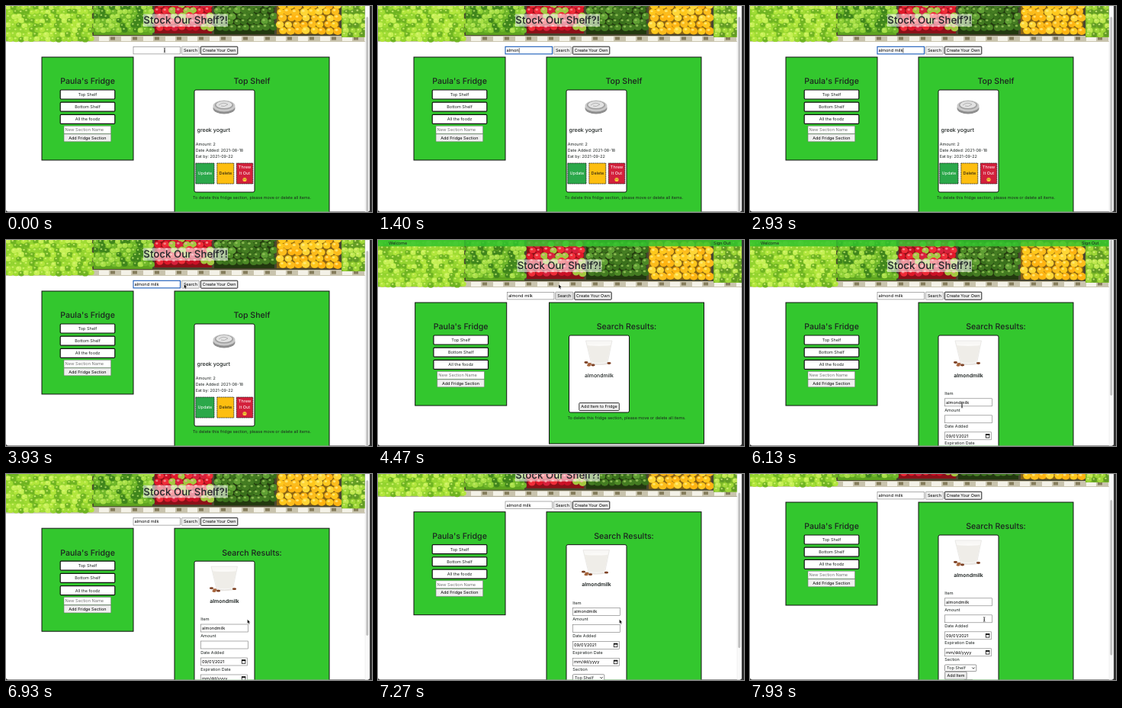
Animation, 480 px wide and 270 px high, one loop 8000 ms. Source, as an HTML page:

```html
<!DOCTYPE html>
<html lang="en">
<head>
<meta charset="utf-8">
<title>Fridge organizer</title>
<style>
  html, body { margin: 0; width: 100%; height: 100%; overflow: hidden; background: #333; }
  svg { display: block; width: 480px; height: 270px; }
  text { font-family: Inter, "Open Sans", sans-serif; white-space: pre; text-rendering: geometricPrecision; }
</style>
</head>
<body>
<svg id="stage" viewBox="0 0 480 270"></svg>
<script>
const GREEN = '#33c72e', INK = '#1c2220';
const LOOP = 8000, FPS = 15;
const SEARCHED = 4200, FORM = 5930, FOCUS = 400;
const QUERY = 'almond milk';
const KEY_TIMES = [800, 930, 1130, 1270, 1400, 1600, 2270, 2530, 2670, 2800, 2930];

// Markup helpers; text y is the middle of the line
const rect = (x, y, w, h, fill, stroke = 'none', sw = .6, r = 0) =>
  `<rect x="${x}" y="${y}" width="${w}" height="${h}" rx="${r}" fill="${fill}" stroke="${stroke}" stroke-width="${sw}"/>`;
const oval = (x, y, rx, ry, fill, more = '') =>
  `<ellipse cx="${x}" cy="${y}" rx="${rx}" ry="${ry}" fill="${fill}" ${more}/>`;
const path = (d, fill, more = '') => `<path d="${d}" fill="${fill}" ${more}/>`;
const text = (x, y, s, size = 5.5, anchor = 'start', weight = 400, fill = INK) =>
  `<text x="${x}" y="${y + size * .36}" font-size="${size}" text-anchor="${anchor}" font-weight="${weight}" fill="${fill}">${s}</text>`;
const mid = (x, y, s, size, weight, fill) => text(x, y, s, size, 'middle', weight, fill);
const group = (id, body) => `<g id="${id}">${body}</g>`;
const button = (x, y, w, label, stroke = '#777', sw = .6) =>
  rect(x, y, w, 10, '#efefef', stroke, sw, .8) + mid(x + w / 2, y + 5, label, 5.45, 400, '#000');
const field = (x, y, w, value = '', fill = '#000') =>
  rect(x, y, w, 10, '#fff', '#777') + text(x + 1.6, y + 5, value, 5.6, 'start', 400, fill);

let seed = 7;
const rnd = () => (seed = seed * 16807 % 2147483647) / 2147483647;

// Each crate: left, right, bottom, base, piece size, highlight, piece colours
function produce() {
  const crates = [
    [0, 113, 61, '#8ed02c', 4, '#dcf77c', ['#b2e63c', '#a0dc34', '#c6f055', '#6fb422', '#94d430']],
    [115, 192, 53, '#5ea320', 4, '#c6ec70', ['#8fd036', '#a9e048', '#3f851c', '#70b82a']],
    [195, 270, 51, '#8c1018', 5, '#f5a8a4', ['#e0182a', '#cc1026', '#f02c38', '#d8203c', '#a4c840']],
    [273, 352, 52, '#22380f', 5, '#a2cc62', ['#4d8a26', '#3a701c', '#60a034', '#447c22']],
    [355, 437, 52, '#8a6414', 5.5, '#fff08a', ['#ffc81c', '#ffb412', '#ffd636', '#fcbc1c']],
    [440, 480, 56, '#7cb828', 4, '#e0f48a', ['#a0d838', '#c0e850', '#629c24']]
  ];
  let out = rect(0, 0, 480, 62, '#4a4630') + rect(0, 54, 480, 8, '#c9c4ae');
  for (let x = 122; x < 480; x += 29) out += rect(x, 55, 13, 6, '#f4f2e8') + rect(x + 15, 55.5, 6, 4, '#857d5c');
  for (const [x0, x1, bottom, base, size, shine, colours] of crates) {
    out += rect(x0, 0, x1 - x0, bottom, base);
    const step = size * 1.75, cols = Math.floor((x1 - x0) / step);
    for (let y = size, row = 0; y < bottom - size / 2; y += step * .85, row++) {
      for (let i = 0; i < cols; i++) {
        const x = x0 + (i + .35 + (row % 2) * .35 + rnd() * .2) * (x1 - x0) / cols;
        const cy = y + rnd() * 1.6, r = size * (.85 + rnd() * .2);
        out += oval(x.toFixed(1), cy.toFixed(1), r, r * .9, colours[Math.floor(rnd() * colours.length)]) +
          oval((x - r * .25).toFixed(1), (cy - r * .3).toFixed(1), r * .35, r * .28, shine, 'opacity=".75"');
      }
    }
  }
  return out;
}

const yogurt =
  oval(286, 149, 14.5, 7.5, '#8f8f8f') + oval(286, 146, 14.5, 7.5, '#c9c9c9') +
  oval(286, 145, 12, 5.5, '#9e9e9e') + oval(286, 144.5, 10.5, 4.5, '#e2e2e2') +
  path('M279 145q6-5 12-1q-5 4-9 2', 'none', 'stroke="#b3b3b3" stroke-width="1"');

const milk =
  oval(285, 162, 16, 2, '#ece8e4') +
  path('M269 132H303.5L297.5 161q-11 3.5-21.5 0Z', '#f8f7f5', 'stroke="#dddcd9" stroke-width=".6"') +
  path('M270.5 137.5h31.5L297 159.5q-10.5 3-20.5 0Z', '#efede8') +
  oval(286.3, 137.5, 15.5, 1.4, '#fbfaf8') +
  [[269.5, 160.5], [274, 162.5], [278.5, 164], [273, 164.3], [299.5, 161.5]]
    .map(([x, y], i) => oval(x, y, 2.6, 1.4, i % 2 ? '#a5633a' : '#7c4023')).join('');

const sectionNote = y => text(245, y, 'To delete this fridge section, please move or delete all items.', 5.43);
const panel = (h, title) => rect(221, 82, 203, h, GREEN, '#111', 1) + mid(322.5, 113.5, title, 10.6, 500);
const card = h => rect(247, 125, 79, h, '#fff', '#111', 1, 2);

const action = (x, w, fill, ink, lines) =>
  rect(x, 221, w, 27, fill).replace('/>', ' style="stroke:#111;stroke-width:.9;stroke-dasharray:1 .7"/>') +
  lines.map((s, i) => mid(x + w / 2, 234.5 + (i - (lines.length > 1 ? 1 : 0)) * 8, s, 5.5, 400, ink)).join('');

const shelfView = panel(220, 'Top Shelf') + card(134) + yogurt +
  text(250.5, 177, 'greek yogurt', 7.1, 'start', 500) +
  text(248.7, 196, 'Amount: 2', 5.4) +
  text(248.7, 204, 'Date Added: 2021-08-18', 5.4) +
  text(248.7, 212.5, 'Eat by: 2021-09-22', 5.4) +
  action(248.8, 24.2, '#2ba84a', '#fff', ['Update']) +
  action(276.8, 22, '#fdbe10', '#111', ['Delete']) +
  action(302.3, 21.5, '#d3203c', '#fff', ['Threw', 'It Out', '']) +
  oval(313, 242.5, 2.6, 2.6, '#f7c93a') + oval(312, 242, .5, .6, '#5a3a10') +
  oval(314, 242, .5, .6, '#5a3a10') + sectionNote(266);

const resultView = panel(185, 'Search Results:') + card(101) + milk +
  mid(286.5, 177.3, 'almondmilk', 6.9, 500) +
  button(260.3, 213.5, 52.5, 'Add Item to Fridge', '#222', .9) + sectionNote(233);

const calendar = y => rect(309.3, y + 2.7, 4.6, 4.6, 'none', '#111', .8) + rect(309, y + 2.5, 5.2, 1.6, '#111');
const label = (y, s) => text(255.3, y, s, 5.5);
const formView = panel(263, 'Search Results:') + card(207) + milk +
  mid(286.5, 177.3, 'almondmilk', 6.9, 600) +
  label(201, 'Item') + field(255.5, 207.8, 62, 'almondmilk') +
  label(222.7, 'Amount') + field(255.5, 229.8, 62) +
  label(244.5, 'Date Added') + field(255.5, 251.8, 61, '09/01/2021') + calendar(251.8) +
  label(266.5, 'Expiration Date') + field(255.5, 273.8, 61, 'mm/dd/yyyy') + calendar(273.8) +
  label(288.5, 'Section') + rect(255.5, 295, 41.3, 8.6, '#fff', '#555', .6, 1) +
  text(258, 299.4, 'Top Shelf', 5.5) +
  path('M291.3 298.5l1.7 1.8l1.7-1.8', 'none', 'stroke="#111" stroke-width=".8"') +
  button(255.7, 304.2, 28.5, 'Add Item', '#555') + button(281, 314.6, 11, '', '#222');

const leftBox = rect(47, 82, 120, 135, GREEN, '#111', 1) +
  mid(107, 113.5, 'Paula\'s Fridge', 10.6, 500) +
  ['Top Shelf', 'Bottom Shelf', 'All the foodz'].map((s, i) =>
    rect(71.2, 125 + i * 16.2, 71.6, 12, '#fff', '#111', 1.2, 1.2) + mid(107, 131 + i * 16.2, s, 5.5)).join('') +
  field(76, 172.2, 61.7, 'New Section Name', '#757575') +
  button(76, 182.8, 61.7, 'Add Fridge Section');

const searchRow =
  rect(180, 25.5, 111, 16.5, 'rgba(255,255,255,.55)') +
  mid(235.5, 33.7, 'Stock Our Shelf?!', 13.3, 500, '#212529') +
  rect(167, 68.3, 61.5, 9.6, '#fff', '#777').replace('<rect', '<rect id="box"') +
  text(168.5, 73.1, '', 5.65, 'start', 400, '#000').replace('<text', '<text id="query"') +
  rect(0, 70, .6, 6.6, '#000').replace('<rect', '<rect id="caret"') +
  group('search', button(230.3, 68.2, 23.2, 'Search')) +
  button(255.4, 68.2, 48.4, 'Create Your Own', '#222', 1);

const $ = id => document.getElementById(id);
$('stage').innerHTML =
  '<clipPath id="win"><path d="M0 0H477V266.5q0 3-3 3H3q-3 0-3-3Z"/></clipPath>' +
  '<g clip-path="url(#win)">' + rect(0, 0, 480, 270, '#fff') +
  group('page',
    produce() + rect(0, 0, 480, 8.3, 'rgba(50,195,45,.85)') + text(14, 4.3, 'Welcome', 5.5) +
    group('signOut', text(435, 4.3, 'Sign Out', 5.5)) +
    group('left', leftBox) + group('center', searchRow) +
    group('right', group('shelf', shelfView) + group('results', resultView) + group('form', formView))) +
  group('bar', rect(471, 0, 6, 270, '#fafafa', '#e4e4e4', .5) +
    rect(472.3, 0, 3, 10, '#c1c1c1', 'none', 0, 1.5).replace('<rect', '<rect id="thumb"')) + '</g>' +
  group('cursor',
    group('arrow', path('M0 0V5.6L1.3 4.4L2.2 6.4L3.1 6L2.3 4.1H4Z', '#000', 'stroke="#fff" stroke-width=".4"')) +
    group('beam', path('M-1.2-3q1.2 0 1.2 1V2q0 1-1.2 1M1.2-3Q0-3 0-2V2q0 1 1.2 1M-.7 .9H.7', 'none', 'stroke="#222" stroke-width=".6"')));

const POINTER = [
  [0, 208, 58], [3330, 208, 58], [4130, 238, 58], [4470, 237, 58], [5000, 240, 64],
  [5270, 256, 105], [5800, 278, 216], [6130, 278, 217], [6670, 316.5, 190.5],
  [7800, 316.5, 190.5], [7870, 307.5, 190.5], [8000, 307, 190.5]
];

function pointerAt(t) {
  const i = POINTER.findIndex(k => k[0] > t);
  const [t0, x0, y0] = POINTER[i - 1], [t1, x1, y1] = POINTER[i];
  const u = (t - t0) / (t1 - t0), e = u * u * (3 - 2 * u);
  return [x0 + (x1 - x0) * e, y0 + (y1 - y0) * e];
}

function scrollAt(t) {
  if (t < SEARCHED) return 15;
  if (t < 6860) return 0;
  return 45 * (1 - Math.max(0, 1 - (t - 6800) / 870) ** 1.65);
}

const show = (id, on) => $(id).setAttribute('visibility', on ? 'inherit' : 'hidden');
const move = (id, x, y = 0) => $(id).setAttribute('transform', `translate(${x} ${y})`);

function draw(t) {
  const view = t < SEARCHED ? 'shelf' : t < FORM ? 'results' : 'form';
  for (const id of ['shelf', 'results', 'form']) $(id).style.display = id === view ? '' : 'none';

  // Without a scrollbar the page is wider, so its columns shift right
  const wide = view === 'results' ? 1 : 0;
  move('left', 1.7 * wide);
  move('center', 2.4 * wide);
  move('right', 3.5 * wide);
  move('signOut', 5 * wide);
  const scroll = scrollAt(t), height = view === 'shelf' ? 285 : 358;
  move('page', 0, -scroll);
  show('bar', !wide);
  $('thumb').setAttribute('y', scroll * 270 / height);
  $('thumb').setAttribute('height', 270 * 270 / height);

  const typed = KEY_TIMES.filter(k => k <= t + 5).length;
  const focused = t >= FOCUS - 5 && t < 4130;
  const query = $('query');
  query.textContent = QUERY.slice(0, typed);
  $('box').setAttribute('stroke', focused ? '#1659b8' : '#777');
  $('box').setAttribute('stroke-width', focused ? 1.1 : .6);
  const lastKey = typed ? KEY_TIMES[typed - 1] : FOCUS;
  show('caret', focused && Math.floor((t - lastKey + 10) / 530) % 2 === 0);
  $('caret').setAttribute('x', 168.6 + (typed ? query.getComputedTextLength() : 0));
  $('search').firstChild.setAttribute('fill', t >= 4130 && t < 5000 ? '#e2e2e2' : '#efefef');

  const [x, y] = pointerAt(t);
  const beam = t < 4130 && x < 229 || t >= FORM && t < 6270 || t >= 7860;
  move('cursor', x, y);
  show('cursor', t < 795 || t >= 3325);
  show('arrow', !beam);
  show('beam', beam);
}

const start = performance.now();
function tick() {
  const t = (performance.now() - start) % LOOP;
  draw(Math.floor((t + 5) * FPS / 1000) * 1000 / FPS % LOOP);
  requestAnimationFrame(tick);
}
tick();
</script>
</body>
</html>
```
